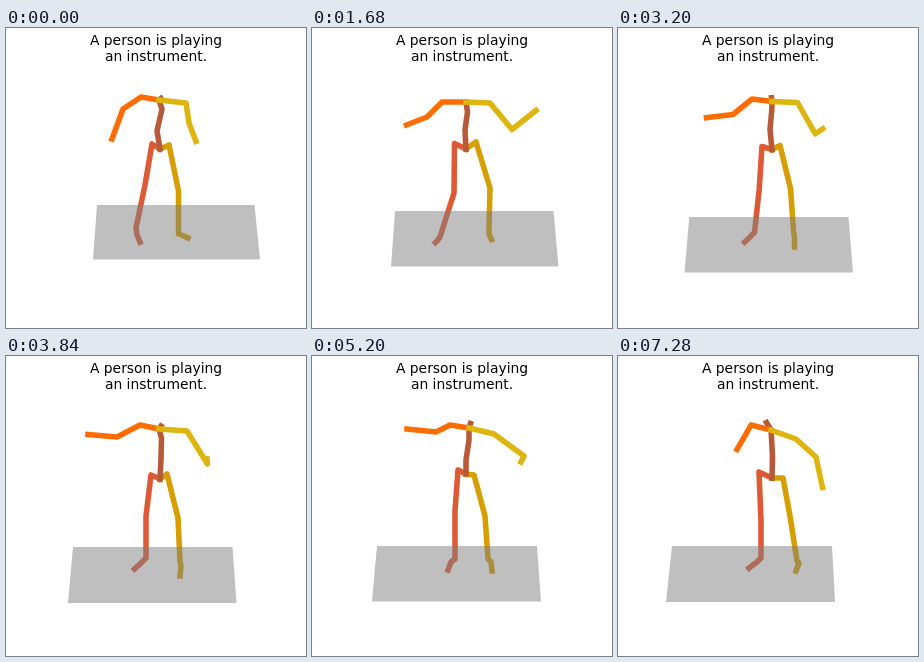
Write an HTML page that moves like this. It is 300 px wide and 300 px high and loops after 7360 ms.

```html
<!DOCTYPE html>
<html lang="en">
<head>
<meta charset="utf-8">
<title>Stick figure</title>
<style>
html, body { margin: 0; width: 100%; height: 100%; overflow: hidden; background: #fff; }
svg { display: block; width: 100vw; height: 100vh; }
text { font: 13.89px "DejaVu Sans", sans-serif; text-anchor: middle; }
path { animation: 7360ms infinite; }
.limb { fill: none; stroke-width: 5.56; stroke-linecap: square; stroke-linejoin: round; }
#right-leg { stroke: #dd5a37; animation-name: right-leg; }
#left-leg { stroke: #d69e00; animation-name: left-leg; }
#spine { stroke: #b75a39; animation-name: spine; }
#right-arm { stroke: #ff6d00; animation-name: right-arm; }
#left-arm { stroke: #ddb50e; animation-name: left-arm; }
#floor { fill: #808080; fill-opacity: .5; animation-name: floor; }

/* Each steps() count gives one pose per 80 ms until the next key. */
@keyframes right-leg {
  0%, 100% { d: path("M154 121L146 116L139 157L130 200L131 207L134 214"); animation-timing-function: steps(21); }
  22.826% { d: path("M154 121L142.5 115.5L142 165L128 209L125 213L123.5 214.5"); animation-timing-function: steps(11); }
  34.782% { d: path("M154 120L143 118L142.5 162L133 207L128 212L125 215"); animation-timing-function: steps(16); }
  52.173% { d: path("M154 123L145 119L140 160L140 202L134 208L128.5 213"); animation-timing-function: steps(17); }
  70.652% { d: path("M154 118L146 114L143 155L143 203L139 206L136 214"); animation-timing-function: steps(11); }
  82.608% { d: path("M154 124L145 121L139 160L136 197L135 202L126 208"); animation-timing-function: steps(15); }
  98.913% { d: path("M154 122L141 116L143 165L143 202L139 206L131 212"); animation-timing-function: steps(1); }
}
@keyframes left-leg {
  0%, 100% { d: path("M154 121L163 117L172.5 163L172.5 206L178 208L182 210"); animation-timing-function: steps(21); }
  22.826% { d: path("M154 121L164 114L178 160L177 200L177 206L179.5 211.5"); animation-timing-function: steps(11); }
  34.782% { d: path("M154 120L163 117L173 159L177 200L178 210L179 218"); animation-timing-function: steps(16); }
  52.173% { d: path("M154 123L161 118L172 162L174 205L175 210L174 220"); animation-timing-function: steps(17); }
  70.652% { d: path("M154 118L162 119L173 160L176 203L179 206L180 215"); animation-timing-function: steps(11); }
  82.608% { d: path("M154 124L166 120L170 163L177 202L180 210L176 221"); animation-timing-function: steps(15); }
  98.913% { d: path("M154 122L165 122L172 160L179 205L181 207L178 215"); animation-timing-function: steps(1); }
}
@keyframes spine {
  0%, 100% { d: path("M154 121L151 103L156 81L153 72L155 70.5"); animation-timing-function: steps(10); }
  10.869% { d: path("M154 121L152 102.5L156 82.5L153.5 73L155 66.5"); animation-timing-function: steps(11); }
  22.826% { d: path("M154 121L153 102L155.5 84L154 74L155 75"); animation-timing-function: steps(11); }
  34.782% { d: path("M154 120L149 100L152 83L155 74L152 69.5"); animation-timing-function: steps(16); }
  52.173% { d: path("M154 123L155 103L155.5 82L153 73L155 70"); animation-timing-function: steps(17); }
  70.652% { d: path("M154 118L154 104L157 84L157 72L158.5 67.5"); animation-timing-function: steps(11); }
  82.608% { d: path("M154 124L154 100L154 84L154 73L153 71"); animation-timing-function: steps(15); }
  98.913% { d: path("M154 122L154.5 100L153.5 82L153 74L148.5 66.5"); animation-timing-function: steps(1); }
}
@keyframes right-arm {
  0%, 100% { d: path("M153 72L135 69L117 81L106 111"); animation-timing-function: steps(21); }
  22.826% { d: path("M154 74L130 74L115 89L94.5 97"); animation-timing-function: steps(11); }
  34.782% { d: path("M155 74L134 73L119 92L95 101"); animation-timing-function: steps(16); }
  52.173% { d: path("M153 73L134 69L111 81L82 78.5"); animation-timing-function: steps(17); }
  70.652% { d: path("M157 72L138 69L124 76L95 73"); animation-timing-function: steps(11); }
  82.608% { d: path("M154 73L134 70L127 86L112 101"); animation-timing-function: steps(15); }
  98.913% { d: path("M153 74L133 69L128 78L119 93.5"); animation-timing-function: steps(1); }
}
@keyframes left-arm {
  0%, 100% { d: path("M153 72L180 75L183 95L190 113.5"); animation-timing-function: steps(21); }
  22.826% { d: path("M154 74L178 75L200 101.5L224 82.5"); animation-timing-function: steps(11); }
  34.782% { d: path("M155 74L178 74L193 103.5L208.5 98.5"); animation-timing-function: steps(16); }
  52.173% { d: path("M153 73L181 75L201.5 108L201 103"); animation-timing-function: steps(17); }
  70.652% { d: path("M157 72L182 78L212 100L209 106"); animation-timing-function: steps(11); }
  82.608% { d: path("M154 73L173 81L203 98L219 118.5"); animation-timing-function: steps(15); }
  98.913% { d: path("M153 74L178 83L198 101L204.5 131.5"); animation-timing-function: steps(1); }
}
@keyframes floor {
  0%, 100% { d: path("M91 177L248.5 177L254 231.5L87 231.5Z"); animation-timing-function: steps(10); }
  10.869% { d: path("M88.5 179L246 179L251 233.5L84.5 233.5Z"); animation-timing-function: steps(8); }
  19.565% { d: path("M82.5 182L240.5 182L246 237.5L78.5 237.5Z"); animation-timing-function: steps(3); }
  22.826% { d: path("M83 183L241.5 183L246.5 238.5L79 238.5Z"); animation-timing-function: steps(11); }
  34.782% { d: path("M75.5 187L234.5 187L239.5 242L71 242Z"); animation-timing-function: steps(16); }
  52.173% { d: path("M67 191L226.5 191L230.5 247L62 247Z"); animation-timing-function: steps(8); }
  60.869% { d: path("M64.5 191L224 191L228 247L59.5 247Z"); animation-timing-function: steps(9); }
  70.652% { d: path("M65 190L225 190L229 245.5L60 245.5Z"); animation-timing-function: steps(11); }
  82.608% { d: path("M58 192L218 192L222 248L53 248Z"); animation-timing-function: steps(10); }
  93.478% { d: path("M53 191L213 191L216.5 247L47 247Z"); animation-timing-function: steps(5); }
  98.913% { d: path("M54 190L214 190L217 246L48 246Z"); animation-timing-function: steps(1); }
}
</style>
</head>
<body>
<svg viewBox="0 0 300 300">
  <text x="150" y="17">A person is playing</text>
  <text x="150" y="33">an instrument.</text>
  <path class="limb" id="right-leg"/>
  <path class="limb" id="left-leg"/>
  <path class="limb" id="spine"/>
  <path class="limb" id="right-arm"/>
  <path class="limb" id="left-arm"/>
  <path id="floor"/>
</svg>
</body>
</html>
```
